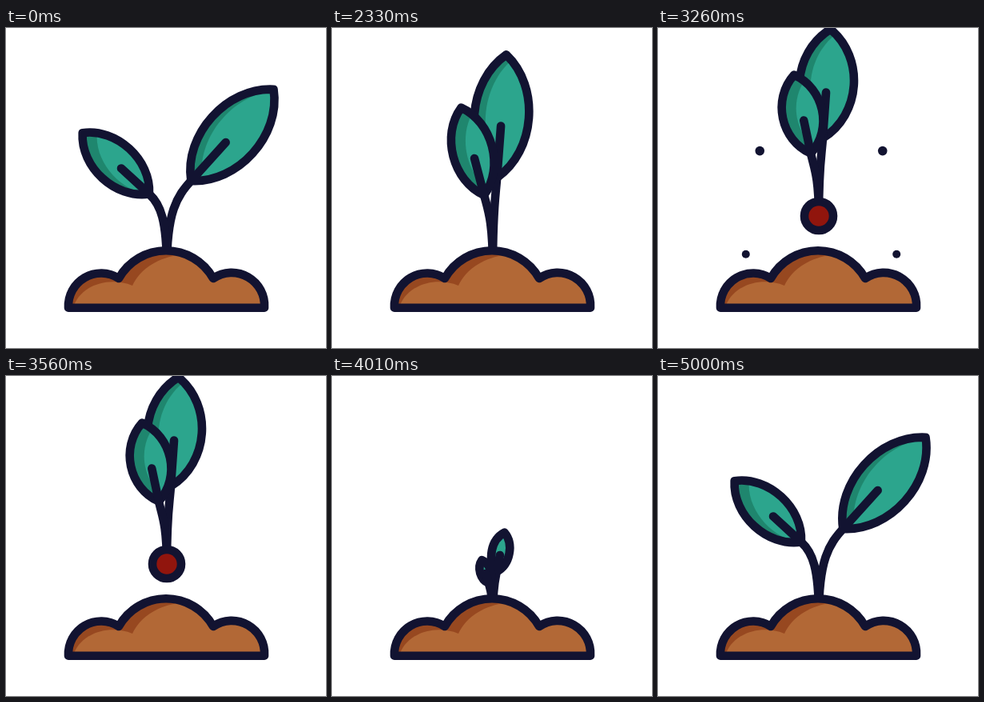
An HTML page for the animation above (5.03 s loop, 400 by 400 pixels).

```html
<!DOCTYPE html>
<html lang="en">
<head>
<meta charset="utf-8">
<title>Sprout</title>
<style>
  html, body { margin: 0; width: 100%; height: 100%; overflow: hidden; background: #fff; }
  svg { display: block; width: 100%; height: 100%; }
  .line { fill: none; stroke: #121331; stroke-width: 10.6; stroke-linecap: round; stroke-linejoin: round; }
  .leaf-dark { fill: #1f866e; }
  .leaf-light { fill: #2ca58d; }
</style>
</head>
<body>
<svg viewBox="0 0 400 400">
  <defs>
    <clipPath id="rightClip"><path class="shape"/></clipPath>
    <clipPath id="leftClip"><path class="shape"/></clipPath>
    <path id="soil" d="M78 349.7A41 41 0 0 1 141 313A67.5 67.5 0 0 1 259 313A41 41 0 0 1 323 349.7Z"/>
    <clipPath id="soilClip"><use href="#soil"/></clipPath>
  </defs>
  <g id="dots" fill="#121331"></g>
  <g id="right">
    <g clip-path="url(#rightClip)"><path class="shape leaf-dark"/><path class="shape leaf-light"/></g>
    <path class="shape line"/><path class="stem line"/>
  </g>
  <g id="left">
    <g clip-path="url(#leftClip)"><path class="shape leaf-dark"/><path class="shape leaf-light"/></g>
    <path class="shape line"/><path class="stem line"/>
  </g>
  <circle id="bulb" class="line" cx="201" r="18" style="fill:#91150d"/>
  <use href="#soil" fill="#974820"/>
  <path clip-path="url(#soilClip)" fill="#b26836"
    d="M84 350C92 322 128 310 158 322C168 300 193 286 217 284V270H340V360H84Z"/>
  <use href="#soil" class="line"/>
</svg>
<script>
const LOOP = 5030, HOLD = 2030, STEM_X = 201, GROUND = 300;
const $ = id => document.getElementById(id);
const mix = (a, b, u) => a + (b - a) * u;
const progress = (t, from, to) => Math.min(1, Math.max(0, (t - from) / (to - from)));
const ramp = (t, from, to) => { const u = progress(t, from, to); return u * u * (3 - 2 * u); };

// The plant closes, pops out of the soil, flings open, drops back and regrows.
const regrow = t => 1 - (1 - progress(t, 3960, 4960)) ** 2;
const openness = t => 1 - ramp(t, 2000, 2350) + 1.4 * ramp(t, 3650, 3850)
  - 1.3 * ramp(t, 3850, 3960) + .9 * regrow(t);
const growth = t => 1 - .75 * ramp(t, 3860, 3950) + .75 * regrow(t);
const lift = t => 65 * ramp(t, 2540, 2860) + 10 * ramp(t, 3640, 3770) - 75 * ramp(t, 3770, 3940);
const stretch = t => 1 + .03 * ramp(t, 2330, 2540) - .17 * ramp(t, 2540, 2860)
  + .14 * ramp(t, 3640, 3770);

// Stem end as offset and height above the bulb, and leaf angle from vertical, closed and open.
const leaf = (side, spec) => ({
  ...spec,
  shapes: [...$(side).querySelectorAll('.shape'), $(side + 'Clip').firstChild],
  light: $(side).querySelector('.leaf-light'),
  stem: $(side).querySelector('.stem')
});
const leaves = [
  leaf('right', {
    closed: { x: 5, height: 113, angle: 4 }, open: { x: 30.3, height: 109, angle: 42.1 },
    size: 154, shade: 14, delay: 0
  }),
  leaf('left', {
    closed: { x: -10, height: 91, angle: -12 }, open: { x: -22, height: 92.5, angle: -47.5 },
    size: 113, shade: 18, delay: 40
  })
];

function drawLeaf({ closed, open, size, shade, delay, shapes, light, stem }, t, bulbY) {
  const blend = key => mix(closed[key], open[key], openness(t - delay));
  const grow = growth(t - delay), s = stretch(t), stemScale = mix(1, grow, .75);
  const x = STEM_X + blend('x') * stemScale, y = bulbY - blend('height') * stemScale * s;
  const width = size * grow, length = width * mix(1, s, .8);
  const a = blend('angle') * Math.PI / 180, dx = Math.sin(a), dy = -Math.cos(a);
  const at = (along, across) => {
    const f = along * length, w = across * width;
    return `${(x + dx * f - dy * w).toFixed(2)} ${(y + dy * f + dx * w).toFixed(2)}`;
  };
  const outline = `M${at(0, 0)}C${at(.24, -.295)} ${at(.76, -.295)} ${at(1, 0)}`
    + `C${at(.76, .295)} ${at(.24, .295)} ${at(0, 0)}Z`;
  shapes.forEach(shape => shape.setAttribute('d', outline));
  light.setAttribute('transform', `translate(${shade * grow} 1)`);
  stem.setAttribute('d', `M${STEM_X} ${bulbY}C${STEM_X} ${mix(bulbY, y, .65)} `
    + `${at(-.17, 0)} ${at(0, 0)}L${at(.42, 0)}`);
}

const dots = [-1, 1].flatMap(side => [
  { dx: side * 101, dy: -94, r: 5.8 },
  { dx: side * 124, dy: 76, r: 5 }
]).map(dot => ({
  ...dot,
  node: $('dots').appendChild(document.createElementNS('http://www.w3.org/2000/svg', 'circle'))
}));

function drawDots(t) {
  const u = progress(t, 2950, 3560), reach = 1 - (1 - u) ** 2;
  dots.forEach(({ dx, dy, r, node }) => {
    node.setAttribute('cx', 204 + dx * reach);
    node.setAttribute('cy', 225 + dy * reach);
    node.setAttribute('r', r * Math.sin(Math.PI * u));
  });
}

function draw(time) {
  const t = time < HOLD ? 0 : time, bulbY = GROUND - lift(t);
  $('bulb').setAttribute('cy', bulbY);
  leaves.forEach(item => drawLeaf(item, t, bulbY));
  drawDots(t);
}

const start = performance.now();
function tick() {
  draw((performance.now() - start) % LOOP);
  requestAnimationFrame(tick);
}
tick();
</script>
</body>
</html>
```
